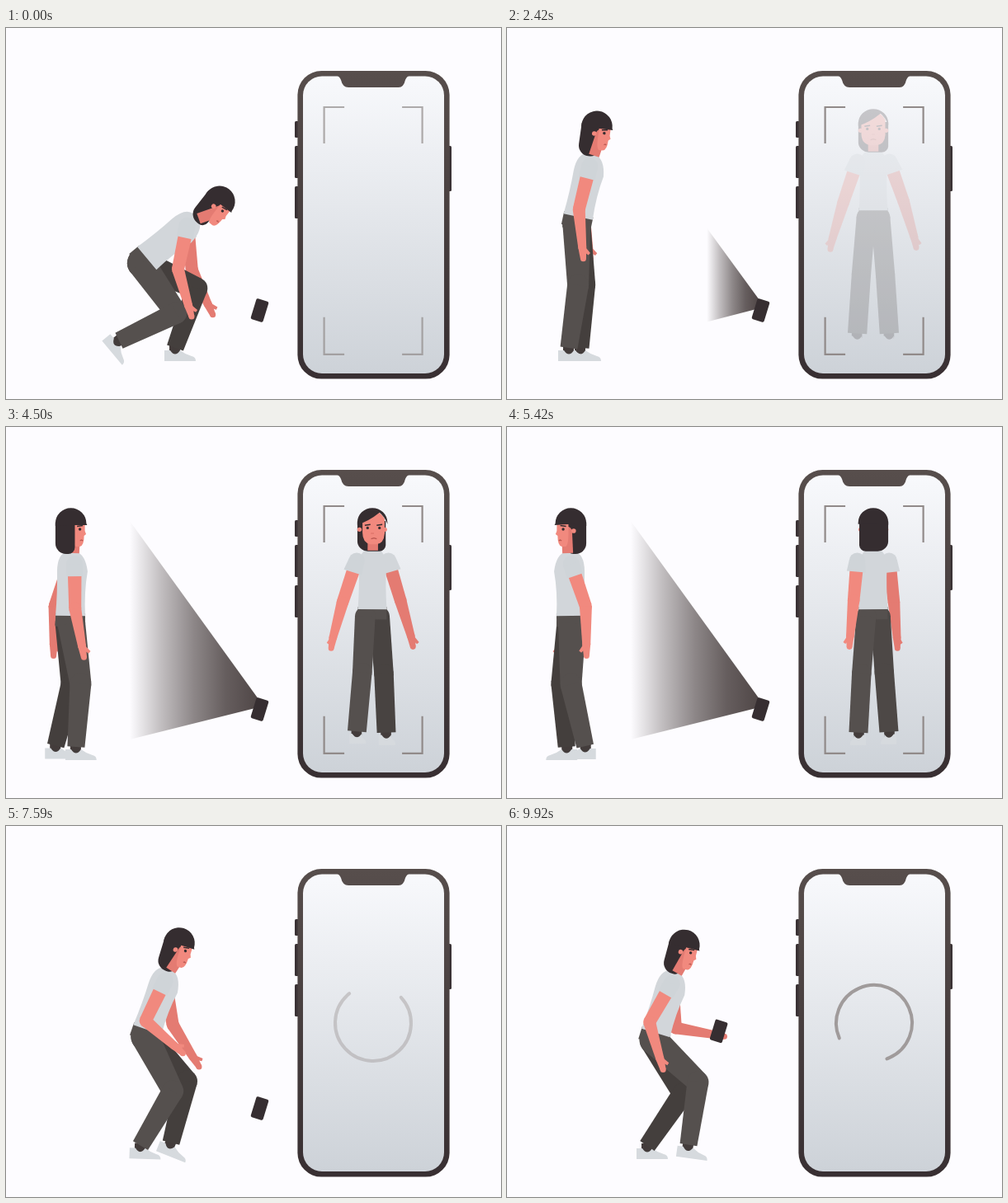
These frames come from a looping animation (600x450 px, 10000 ms). An HTML page with a canvas:

```html
<!DOCTYPE html>
<html lang="en">
<head>
<meta charset="utf-8">
<title>Body scan</title>
<style>
html, body { margin: 0; width: 100%; height: 100%; overflow: hidden; background: #fdfcff; }
canvas { display: block; width: 600px; height: 450px; }
</style>
</head>
<body>
<canvas id="stage" width="600" height="450"></canvas>
<script>
const LOOP = 10000;
const HAIR = '#352d30', SKIN = '#f1897e', SKIN_FAR = '#e47b72', SHIRT = '#d2d6da', SHOE = '#d6dade';
const PANTS = [85, 80, 78], PANTS_FAR = [68, 63, 61];
const RAD = Math.PI / 180;

const stage = document.getElementById('stage').getContext('2d');
const layer = document.createElement('canvas');
layer.width = 600;
layer.height = 450;
const layerCtx = layer.getContext('2d');
let g = stage;

// time, hip x, hip y, lean, head tilt, near arm (upper, fore), far arm (upper, fore)
const BODY = [
  [0, 170, 280, 50, 38, -12, 16, 6, 25],
  [900, 150, 240, 14, 12, -14, 10, -4, 14],
  [2420, 86, 230, 12, 8, -14, 5, -8, 8],
  [3200, 78, 230, 1, 0, -1, 9, -18, 0],
  [6550, 78, 230, 1, 0, -1, 9, -18, 0],
  [6750, 79, 230, 1, 2, -4, 30, -4, 12],
  [7590, 171, 248, 19, 17, -26, 49, 10, 32],
  [8350, 203, 284, 60, 40, -5, 20, 24, 26],
  [8700, 203, 284, 60, 40, -5, 20, 24, 26],
  [9650, 180, 252, 17, 15, -30, 16, 5, 80]
];
// time, ankle x, foot pitch
const NEAR_FOOT = [
  [0, 137, 50], [700, 137, 0], [900, 137, 0], [1250, 104, 0], [1600, 104, 0], [2000, 75, 0],
  [2750, 75, 0], [3150, 82, 0], [6950, 82, 0], [7350, 163, 0], [7900, 163, 5], [8350, 163, 55],
  [8800, 163, 55], [9250, 220, 8]
];
const FAR_FOOT = [
  [0, 205, 0], [550, 205, 0], [900, 172, 0], [1250, 172, 0], [1600, 128, 0], [2000, 128, 0],
  [2350, 89, 0], [2430, 89, 0], [2800, 63, 0], [6600, 63, 0], [7000, 125, 0], [7230, 125, 0],
  [7590, 200, 22], [7750, 200, 10], [8200, 245, 0], [9150, 245, 0], [9600, 170, 0]
];

const mix = (a, b, u) => a + (b - a) * u;
const ramp = (a, b, t) => {
  const u = Math.min(1, Math.max(0, (t - a) / (b - a)));
  return u * u * (3 - 2 * u);
};

function sample(rows, t) {
  let i = 0;
  while (i < rows.length - 2 && t >= rows[i + 1][0]) i++;
  const a = rows[i], b = rows[i + 1], u = ramp(a[0], b[0], t);
  return a.map((v, k) => mix(v, b[k], u));
}

function foot(rows, t) {
  const [, x, pitch] = sample(rows, t);
  const i = Math.max(1, rows.findIndex(r => r[0] > t));
  const a = rows[i - 1], b = rows[i];
  const u = Math.min(1, Math.max(0, (t - a[0]) / (b[0] - a[0])));
  const lift = Math.min(4, Math.abs(b[1] - a[1]) * 0.1) * Math.sin(Math.PI * u);
  return { x, pitch: pitch * RAD, y: 388 - pitch * RAD * 10 - lift };
}

function pose(t) {
  const [, x, y, lean, tilt, a, b, c, d] = sample(BODY, t);
  return {
    x, y, lean: lean * RAD, tilt: tilt * RAD,
    arms: [[a * RAD, b * RAD], [c * RAD, d * RAD]],
    feet: [foot(NEAR_FOOT, t), foot(FAR_FOOT, t)]
  };
}

function dot(x, y, r, color) {
  g.fillStyle = color;
  g.beginPath();
  g.arc(x, y, r, 0, 7);
  g.fill();
}

function line(points, color, width) {
  g.strokeStyle = color;
  g.lineWidth = width;
  g.beginPath();
  points.forEach(([x, y]) => g.lineTo(x, y));
  g.stroke();
}

function box(x, y, w, h, r, fill) {
  g.fillStyle = fill;
  g.beginPath();
  g.roundRect(x, y, w, h, r);
  g.fill();
}

// Tapered chain with round joints and a flat end
function limb(color, pts, widths) {
  for (let i = 0; i < pts.length - 1; i++) {
    const [x, y] = pts[i], [X, Y] = pts[i + 1];
    const d = Math.hypot(X - x, Y - y) || 1;
    const nx = (y - Y) / d / 2, ny = (X - x) / d / 2, w = widths[i], W = widths[i + 1];
    dot(x, y, w / 2, color);
    g.beginPath();
    g.moveTo(x + nx * w, y + ny * w);
    g.lineTo(X + nx * W, Y + ny * W);
    g.lineTo(X - nx * W, Y - ny * W);
    g.lineTo(x - nx * w, y - ny * w);
    g.fill();
  }
}

function head(x, y, base, tilt, s, c) {
  const a = Math.abs(s);
  const local = draw => {
    g.save();
    g.translate(x, y);
    g.rotate(tilt * s);
    if (s < 0) g.scale(-1, 1);
    draw();
    g.restore();
  };
  const mass = () => local(() => box(-18.7, -2, 37.4 - 14 * a, 39, [0, 0, 8, 13], HAIR));
  const neck = () => limb(SKIN_FAR, [[x + 5 * s, y + 10], base], [13, 13]);
  const face = () => local(() => {
    const l = -15 + 18 * a, r = 15 + 2 * a;
    g.fillStyle = SKIN;
    g.beginPath();
    g.moveTo(l, -5);
    g.quadraticCurveTo(4, -24, r, -5);
    g.lineTo(r, 9);
    g.lineTo(r + 1.5 * a, 13);
    g.lineTo(r - a, 15);
    g.quadraticCurveTo(r - 1, 27, mix(4, 11, a), 28);
    g.lineTo(mix(-4, 6, a), 28);
    g.quadraticCurveTo(l, 26, l, 13);
    g.fill();
    for (const k of [-1, 1]) {
      if (-k * a * 17 > -6) dot(-2 * a + k * 16 * c, 9, 2.8, SKIN);
    }
    for (const k of [-1, 1]) {
      if (10 * c - k * 7.5 * a <= 0) continue;
      const ex = 10 * a + k * 7.5 * c;
      dot(ex, 7, 1.7, HAIR);
      line([[ex - 3.5, 3.5], [ex + 3.5, 2.5]], HAIR, 1.6);
    }
    if (c > 0.3) line([[-2, 14], [2, 14]], '#dc7067', 1.2);
    if (c > -0.3) {
      const w = 1.5 + 2 * Math.abs(c);
      line([[13 * a - w, 21], [13 * a, 20], [13 * a + w, 21]], '#b9564f', 1.2);
    }
  });
  const fringe = () => local(() => {
    const front = Math.max(0, c), part = (s < 0 ? -1 : 1) * mix(4, 9, front), rise = 2 - 15 * front;
    g.fillStyle = HAIR;
    g.beginPath();
    g.moveTo(-18.8, 3);
    g.quadraticCurveTo(-4, 2 - 4 * front, part, rise);
    g.quadraticCurveTo(mix(12, 15, front), rise + 5 * front, 18.8 + a, 2);
    g.arc(0, 0, 18.8, 0, Math.PI, true);
    g.fill();
  });
  (c >= -0.01 ? [mass, neck, face, fringe] : [neck, face, mass, fringe]).forEach(part => part());
}

function shoe(x, y, pitch, s) {
  const a = Math.abs(s), heel = mix(-9, -13, a), toe = mix(9, 25, a);
  g.save();
  g.translate(x, y);
  g.rotate(pitch * s);
  if (s < 0) g.scale(-1, 1);
  box(-7, -3, 13, 11, [0, 0, 4, 4], '#433c3b');
  g.fillStyle = SHOE;
  g.beginPath();
  g.moveTo(heel, 3);
  g.lineTo(-6, 3);
  g.quadraticCurveTo(0, 12, 6, 3);
  g.quadraticCurveTo(toe * 0.5, 8, toe * 0.8, 10);
  g.quadraticCurveTo(toe, 11, toe, 16);
  g.lineTo(heel, 16);
  g.fill();
  g.restore();
}

// Yaw 0 faces the viewer, 90 faces right. Returns the wrist of the far arm.
function person(p, yaw) {
  const s = Math.sin(yaw * RAD), c = Math.cos(yaw * RAD), a = Math.abs(s);
  const near = s >= 0 ? 0 : 1, far = 1 - near;
  const sideOf = i => i ? 1 : -1;
  const at = (f, y, l = 0) => [p.x + f * s + l * c, y];
  const spin = (u, v, ang) => [u * Math.cos(ang) - v * Math.sin(ang), u * Math.sin(ang) + v * Math.cos(ang)];
  const spine = (u, v) => {
    const [f, y] = spin(u, v, p.lean);
    return [f, p.y + y];
  };
  const farMix = Math.min(1, a * 5);
  const farPants = 'rgb(' + PANTS.map((v, i) => Math.round(mix(v, PANTS_FAR[i], farMix))) + ')';
  const nearPants = 'rgb(' + PANTS + ')';

  const leg = i => {
    const k = sideOf(i), ft = p.feet[i], T = 74, S = 77;
    const [hf, hy] = spine(0, 8);
    const step = 5 * Math.max(0, k * Math.sin(2 * (yaw - 90) * RAD)) * p.turning;
    const af = ft.x - p.x, ay = ft.y - step;
    const dx = af - hf, dy = ay - hy, d = Math.hypot(dx, dy);
    const m = d < T + S ? (T * T - S * S + d * d) / (2 * d) : d / 2;
    const h = d < T + S ? Math.sqrt(T * T - m * m) : 0;
    const kf = hf + (dx * m + dy * h) / d, ky = hy + (dy * m - dx * h) / d;
    const hem = at(af, ay, k * 20);
    shoe(hem[0], hem[1], ft.pitch, s);
    limb(i === near ? nearPants : farPants,
      [at(hf, hy, k * 9), at(kf, ky, k * 15), hem], [mix(24, 34, a), mix(24, 26, a), mix(24, 21, a)]);
  };

  const arm = i => {
    const k = sideOf(i), [up, fore] = p.arms[i], splay = 0.22 + 0.11 * c;
    const [f, y] = spine(1, -64);
    const ef = f + 54 * Math.sin(up), ey = y + 54 * Math.cos(up);
    const wf = ef + 46 * Math.sin(fore), wy = ey + 46 * Math.cos(fore);
    const l = n => k * (20 + n * splay);
    const top = at(f, y, l(0)), elbow = at(ef, ey, l(54)), wrist = at(wf, wy, l(94));
    const tip = at(wf + 14 * Math.sin(fore), wy + 14 * Math.cos(fore), l(102));
    const thumb = at(wf + 12 * Math.sin(fore + 0.7), wy + 12 * Math.cos(fore + 0.7), l(100) + k * 6 * Math.abs(c));
    const skin = i === near ? SKIN : SKIN_FAR;
    limb(skin, [top, elbow, wrist, tip], [17, 15, 10, 7]);
    dot(tip[0], tip[1], 3.5, skin);
    limb(skin, [wrist, thumb], [6, 3.5]);
    const cuff = [mix(top[0], elbow[0], 0.28), mix(top[1], elbow[1], 0.28)];
    limb(i === near ? '#cfd4d8' : SHIRT, [top, cuff], [20, mix(24, 20, a)]);
    return wrist;
  };

  const torso = draw => {
    g.save();
    g.translate(p.x, p.y);
    g.rotate(p.lean * s);
    draw();
    g.restore();
  };

  const wrist = arm(far);
  leg(far);
  torso(() => box(-18, -4, 36, 16, 0, nearPants));
  leg(near);
  torso(() => {
    const front = 17 + 3 * Math.max(0, s), back = -17 - 3 * Math.max(0, -s);
    g.fillStyle = SHIRT;
    g.beginPath();
    g.moveTo(-18, -1);
    g.quadraticCurveTo(-16, -30, back, -55);
    g.quadraticCurveTo(-17, -76, -5, -79);
    g.lineTo(5, -79);
    g.quadraticCurveTo(17, -76, front, -55);
    g.quadraticCurveTo(16, -30, 18, -1);
    g.fill();
  });
  const [nf, ny] = spine(0, -79);
  const [of, oy] = spin(-1, -34, 0.4 * p.lean + p.tilt);
  const [hx, hy] = at(nf + of, ny + oy);
  head(hx, hy, at(nf + 3, ny + 2), p.tilt, s, c);
  arm(near);
  return wrist;
}

function beam(k) {
  if (k <= 0) return;
  const left = 305 - 155 * k;
  const fill = g.createLinearGradient(left, 0, 305, 0);
  for (const stop of [0, 0.25, 0.5, 0.75, 1]) {
    fill.addColorStop(stop, `rgba(80,71,71,${1 - (1 - stop) ** 1.5})`);
  }
  g.fillStyle = fill;
  g.beginPath();
  g.moveTo(306, 330);
  g.lineTo(left, 330 - 216 * k);
  g.lineTo(left, 341 + 38 * k);
  g.lineTo(302, 341);
  g.fill();
}

function handset(x, y) {
  g.save();
  g.translate(x, y);
  g.rotate(17 * RAD);
  box(-7.8, -13, 15.6, 26, 2, '#362e31');
  g.restore();
}

function device() {
  const shell = g.createLinearGradient(0, 52, 0, 426);
  shell.addColorStop(0, '#574e4c');
  shell.addColorStop(1, '#382f32');
  for (const [x, y, h] of [[350, 113, 20], [350, 143, 39], [350, 192, 39], [534, 143, 55]]) {
    box(x, y, 6, h, 1.5, '#3a3235');
  }
  box(353.4, 52, 184.2, 373.6, 29, shell);
  const glass = g.createLinearGradient(0, 58, 0, 419);
  glass.addColorStop(0, '#f8f9fc');
  glass.addColorStop(1, '#cdd2d8');
  box(360, 58.5, 171, 360.5, 23, glass);
  g.fillStyle = shell;
  g.beginPath();
  g.moveTo(399, 57);
  g.quadraticCurveTo(404, 58, 406, 63);
  g.quadraticCurveTo(408, 72, 415, 72);
  g.lineTo(476, 72);
  g.quadraticCurveTo(482, 72, 484, 63);
  g.quadraticCurveTo(486, 58, 491, 57);
  g.fill();
}

function brackets(alpha) {
  g.globalAlpha = alpha;
  for (const [x, dx] of [[385.6, 24.5], [504.6, -24.5]]) {
    for (const [y, dy] of [[96, 44], [395.8, -45]]) {
      line([[x, y + dy], [x, y], [x + dx, y]], '#918a89', 2.2);
    }
  }
  g.globalAlpha = 1;
}

function spinner(t) {
  const gap = (-86 + (t - 7590) * 0.24) * RAD;
  g.globalAlpha = ramp(7400, 7800, t);
  g.strokeStyle = '#a09b9b';
  g.lineWidth = 4;
  g.lineCap = 'round';
  g.beginPath();
  g.arc(445, 239, 46, gap + 43 * RAD, gap + 317 * RAD);
  g.stroke();
  g.lineCap = 'butt';
  g.globalAlpha = 1;
}

function scanned(yaw, alpha, turning) {
  if (alpha <= 0) return;
  g = layerCtx;
  g.clearRect(0, 0, 600, 450);
  g.save();
  g.translate(444, 98);
  g.scale(0.97, 0.94);
  g.translate(-78, -98);
  person({ ...pose(4000), turning }, yaw);
  g.restore();
  g = stage;
  g.globalAlpha = alpha;
  g.drawImage(layer, 0, 0);
  g.globalAlpha = 1;
}

function draw(t) {
  g.fillStyle = '#fdfcff';
  g.fillRect(0, 0, 600, 450);
  const yaw = 90 + 360 * ramp(4300, 6500, t);
  const turning = t > 4300 && t < 6500 ? 1 : 0;

  device();
  brackets((0.7 + 0.3 * ramp(0, 400, t)) * (1 - ramp(6700, 7200, t)));
  scanned(yaw - 90, ramp(2180, 2950, t) * (1 - ramp(6750, 7300, t)), turning);
  spinner(t);

  beam(ramp(2050, 2900, t) * (1 - ramp(6650, 7400, t)));
  const [hx, hy] = person({ ...pose(t), turning }, yaw);
  const held = ramp(8600, 8750, t);
  handset(mix(307.5, hx + 7, held), mix(342.5, hy - 4, held));
}

function tick() {
  draw(performance.now() % LOOP);
  requestAnimationFrame(tick);
}
tick();
</script>
</body>
</html>
```
